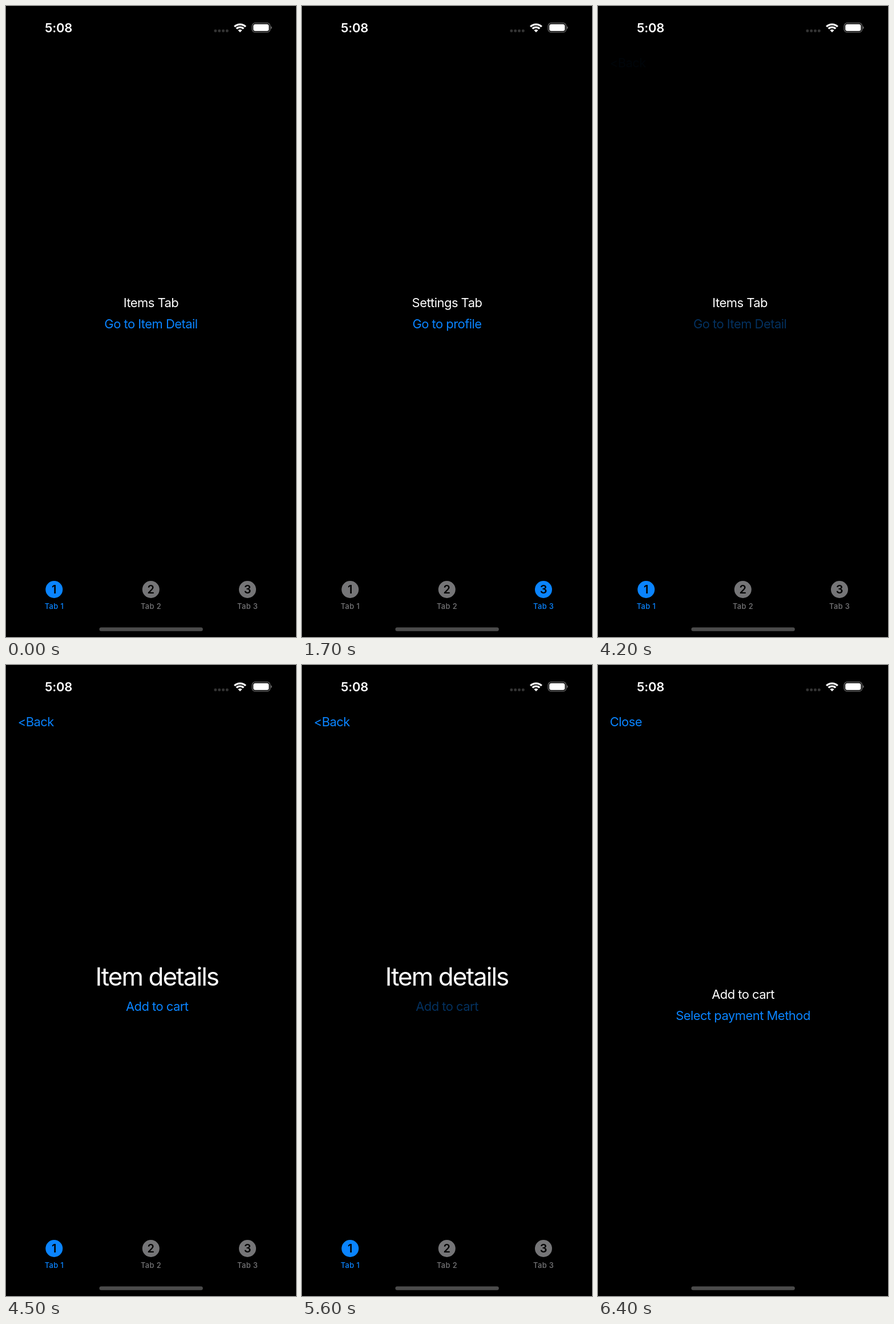
Animation, 508 px wide and 1102 px high, one loop 8000 ms. Source, as an HTML page:

```html
<!DOCTYPE html>
<html lang="en">
<head>
<meta charset="utf-8">
<title>Tab navigation</title>
<style>
  html, body { margin: 0; width: 100%; height: 100%; overflow: hidden; background: #000; }
  svg { display: block; width: 100vw; height: 100vh; }
  text {
    font: 400 22px Inter, Roboto, sans-serif;
    font-optical-sizing: none;
    letter-spacing: -.025em;
    fill: #fff;
  }
  .mid { text-anchor: middle; }
  .link { fill: #0a84ff; }
  .title { font-size: 44px; letter-spacing: -.045em; }
  .time { font-weight: 600; letter-spacing: -.01em; }
  .tab { fill: #757577; }
  .tab.on { fill: #0a84ff; }
  .tab text { font-size: 12.9px; font-weight: 500; letter-spacing: .03em; fill: inherit; }
  .tab .num { font-size: 20px; font-weight: 600; letter-spacing: 0; fill: #000; }
</style>
</head>
<body>
<svg viewBox="0 0 508 1102">
  <rect width="508" height="1102"/>

  <g id="home">
    <text id="heading" class="mid" x="254" y="526"></text>
    <text id="action" class="mid link" x="254" y="562.6"></text>
  </g>

  <g id="detail">
    <rect width="508" height="1102"/>
    <text class="mid title" x="253.5" y="559.5">Item details</text>
    <text id="add" class="mid link" x="254" y="603.5">Add to cart</text>
  </g>
  <text id="back" class="link" x="20.7" y="107">&lt;Back</text>

  <g id="tabs"></g>

  <g id="cart">
    <rect width="508" height="1102"/>
    <text class="link" x="20.7" y="107">Close</text>
    <text class="mid" x="254" y="583">Add to cart</text>
    <text class="mid link" x="254" y="619.5">Select payment Method</text>
  </g>

  <!-- status bar -->
  <text class="time" x="68" y="46">5:08</text>
  <g fill="#343434">
    <rect x="364.5" y="41" width="4.8" height="4.8" rx="1.8"/>
    <rect x="371.3" y="41" width="4.8" height="4.8" rx="1.8"/>
    <rect x="378.1" y="41" width="4.8" height="4.8" rx="1.8"/>
    <rect x="384.9" y="41" width="4.8" height="4.8" rx="1.8"/>
  </g>
  <g fill="none" stroke="#fff" stroke-width="3.3">
    <path d="M400.2 36.2a13.9 13.9 0 0 1 19.6 0"/>
    <path d="M403.7 39.7a8.9 8.9 0 0 1 12.6 0"/>
    <path d="M410 46l-3.5-3.5a5 5 0 0 1 7 0z" fill="#fff" stroke="none"/>
  </g>
  <rect x="431.2" y="29.7" width="31.4" height="16.2" rx="5.2" fill="none" stroke="#6b6b6b" stroke-width="1.3"/>
  <rect x="433.2" y="31.8" width="27.3" height="12" rx="3.5" fill="#fff"/>
  <path d="M464 35.2a2.8 2.8 0 0 1 0 5.2z" fill="#757575"/>

  <rect x="163.5" y="1085.3" width="181.3" height="6.5" rx="3.25" fill="#4b4b4b"/>
</svg>
<script>
const LOOP = 8000, TICK = 100, W = 508, H = 1102;
const PUSH = 4184, MODAL = 5600;
const PAGES = [
  ['Items Tab', 'Go to Item Detail'],
  ['Orders Tab', 'Go to Order Detail'],
  ['Settings Tab', 'Go to profile']
];
const $ = id => document.getElementById(id);

$('tabs').innerHTML = [84.3, 253.8, 423].map((x, i) => `
  <g class="tab">
    <circle cx="${x}" cy="1019" r="15"/>
    <text class="mid num" x="${x}" y="1026.2">${i + 1}</text>
    <text class="mid" x="${x + .2}" y="1053">Tab ${i + 1}</text>
  </g>`).join('');
const tabs = [...document.querySelectorAll('.tab')];

// Critically damped spring: 1 at the start, settling to 0.
const spring = (ms, rate) => {
  const k = Math.max(0, ms) / 1000 * rate;
  return (1 + k) * Math.exp(-k);
};
// The last visible step rests a moment before the view snaps into place.
const settle = (t, rest, end) => t < end ? Math.min(t, rest) : t + 1000;
const pressed = (t, at) => t < at ? 1 : Math.min(1, .37 + (t - at) / 300);
const move = (id, x, y) => $(id).setAttribute('transform', `translate(${x.toFixed(2)} ${y.toFixed(2)})`);

function draw(t) {
  const page = t < 500 ? 0 : t < 1700 ? 1 : t < 3100 ? 2 : 0;
  [$('heading').textContent, $('action').textContent] = PAGES[page];
  tabs.forEach((tab, i) => tab.classList.toggle('on', i === page));

  const push = spring(settle(t, 4660, 4900) - PUSH, 18.26);
  move('home', -.3 * W * (1 - push), 0);
  move('detail', W * push, 0);
  $('back').setAttribute('opacity', 1 - push);
  $('action').setAttribute('opacity', pressed(t, 4200));
  $('add').setAttribute('opacity', pressed(t, MODAL));

  move('cart', 0, H * spring(settle(t, 6045, 6400) - MODAL, 17));
}

const start = performance.now();
function frame() {
  const t = (performance.now() - start) % LOOP;
  draw(Math.floor(t / TICK) * TICK);
  requestAnimationFrame(frame);
}
frame();
</script>
</body>
</html>
```
